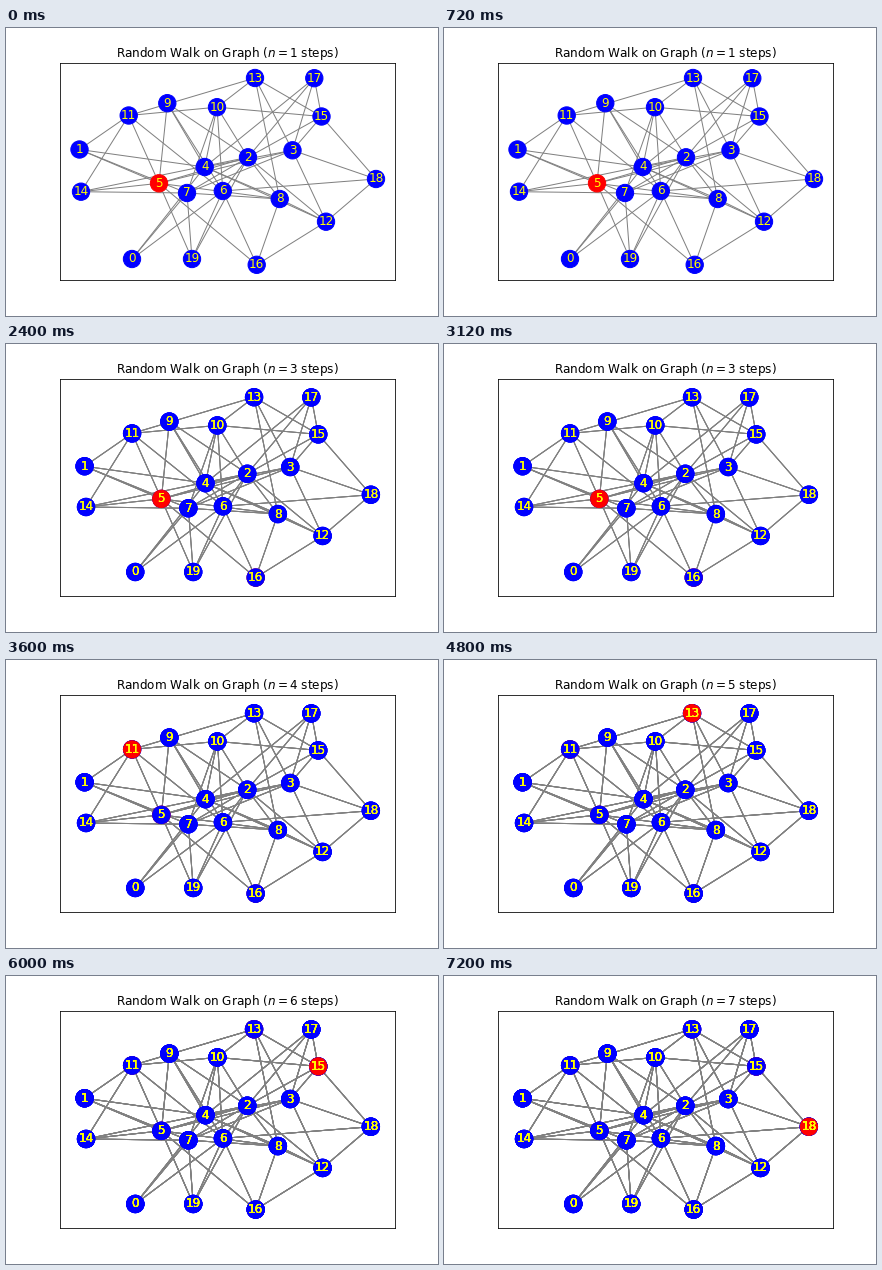
A matplotlib script for the animation above (8 s loop, 432x288 px).

```python
from itertools import pairwise

import matplotlib.pyplot as plt
from matplotlib.animation import FuncAnimation
from matplotlib.collections import LineCollection

W, H = 432, 288
LEFT, BOTTOM, WIDTH, HEIGHT = 0.125, 0.125, 0.775, 0.755
CX, CY = W * (LEFT + WIDTH / 2), H * (1 - BOTTOM - HEIGHT / 2)

# Key points of the layout, in stage pixels
NODES = [
    (126, 231), (73.5, 121.5), (242, 129.3), (286.5, 122.3), (198.7, 139),
    (153, 155.3), (216.8, 163), (181, 165), (273.7, 171), (161.3, 75.2),
    (211, 79.2), (122.7, 87.5), (320, 193.7), (249, 50), (75, 163.7),
    (315.5, 88.5), (250.7, 236.8), (308.3, 50.2), (370, 151), (186, 231),
]
WALK = [5, 16, 5, 11, 13, 15, 18]
NEIGHBOURS = {
    0: (4, 6, 7),
    1: (4, 5, 7, 11),
    2: (5, 6, 7, 8, 9, 10, 12, 14, 15, 17, 19),
    3: (4, 5, 7, 12, 13, 15, 17, 18),
    4: (8, 9, 10, 12, 17),
    5: (8, 9, 14, 19),
    6: (9, 10, 11, 16, 18, 19),
    7: (8, 10, 14, 19),
    8: (12, 13, 16),
    10: (11, 13, 15),
    11: (14,),
    12: (16, 18),
    15: (17,),
}

# The walk can only follow edges, so its own steps complete the graph.
links = {(a, b) for a, ends in NEIGHBOURS.items() for b in ends}
links |= {(min(step), max(step)) for step in pairwise(WALK)}
segments = [(NODES[a], NODES[b]) for a, b in sorted(links)]
xs, ys = zip(*NODES)

fig = plt.figure(figsize=(W / 72, H / 72), dpi=72, facecolor="white")
ax = fig.add_axes([LEFT, BOTTOM, WIDTH, HEIGHT])
ax.set_xticks([])
ax.set_yticks([])
title = ax.set_title("", fontsize=12)


def draw_graph(current):
    """Draw the whole graph once, with the walker's node in red."""
    edges = LineCollection(segments, colors="gray", linewidths=1, zorder=1)
    ax.add_collection(edges, autolim=False)
    colors = ["red" if i == current else "blue" for i in range(len(NODES))]
    dots = ax.scatter(xs, ys, s=300, c=colors, linewidths=1, zorder=2)
    labels = [
        ax.text(x, y, str(i), color="yellow", fontsize=12,
                ha="center", va="center", zorder=3)
        for i, (x, y) in enumerate(NODES)
    ]
    return [edges, dots, *labels]


layers = [draw_graph(node) for node in WALK]


def set_view(step):
    """Widen the margins, settling geometrically on their final size."""
    scale = 0.9655 + 0.0345 * 0.07 ** step
    dx, dy = W * WIDTH / 2 / scale, H * HEIGHT / 2 / scale
    ax.set_xlim(CX - dx, CX + dx)
    ax.set_ylim(CY + dy, CY - dy)


def update(frame):
    step = frame // 3
    # Each step is painted over the ones before it.
    for i, layer in enumerate(layers):
        for artist in layer:
            artist.set_visible(i <= step)
    set_view(step)
    title.set_text(f"Random Walk on Graph ($n = {step + 1}$ steps)")
    return []


anim = FuncAnimation(fig, update, frames=20, interval=400,
                     init_func=lambda: update(0), repeat=True, repeat_delay=0)
plt.show()
```
